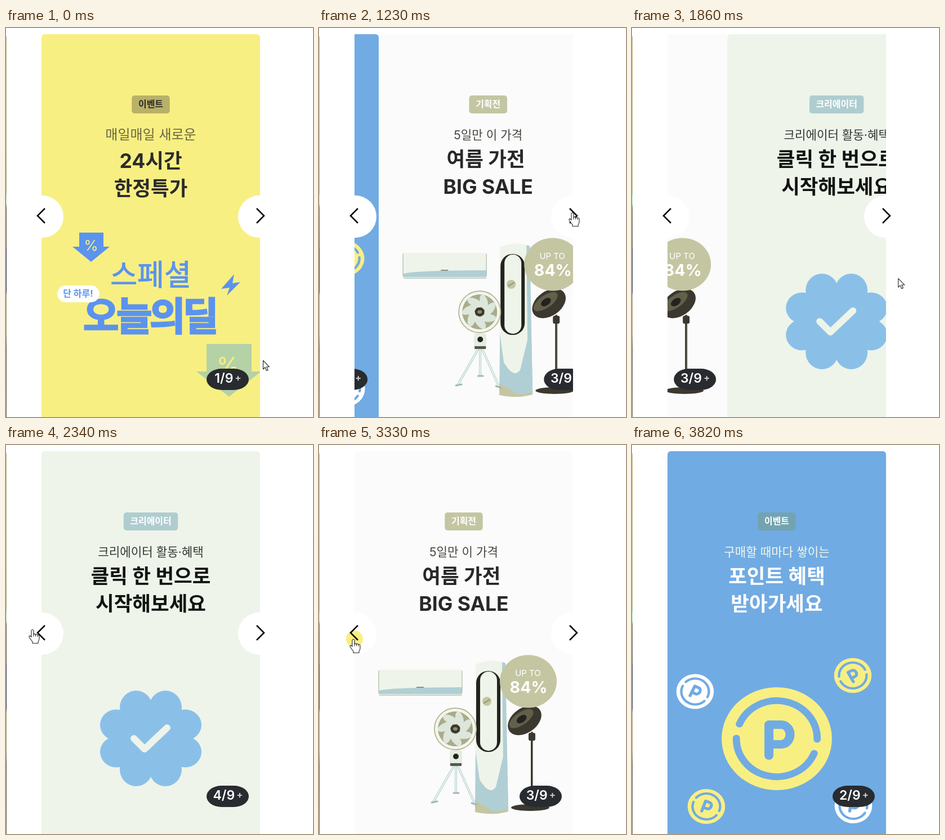
An HTML page that plays this animation: 545 by 692 pixels, repeating every 3970 ms.

```html
<!DOCTYPE html>
<html lang="ko">
<meta charset="utf-8">
<title>Banner carousel</title>
<style>
  html, body { margin: 0; height: 100%; overflow: hidden; background: #fff; }
  svg { display: block; width: 100%; height: 100%; }
  text { font-family: Inter, "Noto Sans CJK KR", "Noto Sans CJK", sans-serif; text-anchor: middle; white-space: pre; }
  .b { font-weight: 700; }
  .line { fill: none; stroke-linecap: round; stroke-linejoin: round; }
</style>
<svg viewBox="0 0 545 692">
  <defs>
    <clipPath id="view"><rect x="63" y="11" width="388" height="681"/></clipPath>
    <linearGradient id="edge" x2="0" y2="1">
      <stop offset="0" stop-color="#b3ac7c"/><stop offset=".41" stop-color="#aaa878"/>
      <stop offset=".42" stop-color="#a9dcae"/><stop offset=".44" stop-color="#a9dcae"/>
      <stop offset=".45" stop-color="#66613f"/><stop offset=".55" stop-color="#55513a"/>
      <stop offset=".56" stop-color="#30304c"/><stop offset=".67" stop-color="#30304c"/>
      <stop offset=".68" stop-color="#9c9768"/><stop offset=".78" stop-color="#9c9768"/>
      <stop offset=".82" stop-color="#55513a"/><stop offset="1" stop-color="#6b6645"/>
    </linearGradient>
  </defs>
  <rect y="15" width="1" height="677" fill="url(#edge)"/>
  <g clip-path="url(#view)"><g id="track"></g></g>
  <g id="nav">
    <g fill="#fff"><ellipse cx="64" cy="335.5" rx="38" ry="37.7"/><ellipse cx="450" cy="335.5" rx="38" ry="37.7"/></g>
    <path d="M69 321 56 334l13 13M445 321l13 13-13 13" fill="none" stroke="#000" stroke-width="2.5"/>
  </g>
  <circle id="ripple" r="15" fill="#f8ef83" style="mix-blend-mode:multiply"/>
  <g id="cursor" fill="#fff" stroke="#222" stroke-width="1.1" stroke-linejoin="round">
    <path id="arrow" d="M.5 .5V16l3.5-3.3 2.5 5.8 2.6-1.1-2.5-5.6H11.5Z"/>
    <path id="hand" d="M-4 2Q-2-1 0 2V8.500q2-1 3.500.5 2-.8 3.500.8 3-.5 3 2.200V17q-.5 3-2 5v2.700H-2V22L-7.500 14.500q-1.500-3 1-3.300L-4 13.500ZM0 8.500v4M3.500 9v3.500M7 10v3"/>
  </g>
</svg>
<script>
const $ = id => document.getElementById(id);
const LOOP = 3970, STEP = 69, LAST = 55, WIDTH = 388, SLIDE_MS = 400;
const YELLOW = '#f8ef83', BLUE = '#5b93ee', SKY = '#71abe3', MINT = '#eef4ea', ICE = '#b0cfd4';
const INK = '#26282a', OLIVE = '#c4c6a2', DARK = '#3a382f', BLACK = '#22231e';

const text = (x, y, size, fill, str, attrs = '') =>
  `<text x="${x}" y="${y}" font-size="${size}" fill="${fill}" ${attrs}>${str}</text>`;
const bold = (x, y, size, fill, str) => text(x, y, size, fill, str, 'class="b"');
const rect = (x, y, w, h, fill, r = 0) =>
  `<rect x="${x}" y="${y}" width="${w}" height="${h}" rx="${r}" fill="${fill}"/>`;
const oval = (x, y, rx, ry, attrs) => `<ellipse cx="${x}" cy="${y}" rx="${rx}" ry="${ry}" ${attrs}/>`;
const path = (d, fill) => `<path d="${d}" fill="${fill}"/>`;
const line = (d, stroke, width) => `<path class="line" d="${d}" stroke="${stroke}" stroke-width="${width}"/>`;

const coin = (x, y, scale, turn, fill) =>
  `<g transform="translate(${x} ${y}) scale(1.07 1) rotate(${turn}) scale(${scale})">
    <circle r="91.5" fill="${fill}"/>
    ${line('M-62-26A67 67 0 0 1 67 1M-67-1A67 67 0 0 0 62 26', SKY, 12)}
    ${line('M-13 30V-25H7.5a14.5 17.500 0 0 1 0 35H-13', SKY, 15)}
  </g>`;

const special = () =>
  path('M130 364H173V389H184L151 416 118 389H130Z', BLUE) + text(151, 396, 26, YELLOW, '%') +
  text(257, 458, 52, BLUE, '스페셜', `font-weight="500" stroke="${BLUE}"`) +
  text(255, 538, 69, BLUE, '오늘의딜', `font-weight="900" letter-spacing="-4.5" stroke="${BLUE}" stroke-width="2.5"`) +
  rect(91, 458, 75, 30, '#fff', 15) + bold(128, 478, 16, BLUE, '단 하루!') +
  path('M405 438 382 464 397 462 392 476 416 452 402 454Z', BLUE) +
  path('M356 562H436V611H453L396 656 338 611H356Z', '#b5d1a6') + text(394, 616, 42, YELLOW, '%');

const points = () =>
  coin(257, 522.5, 1, 0, YELLOW) + coin(112, 438.5, .34, 25, '#fff') + coin(392, 410, .34, -28, YELLOW) +
  coin(132, 643, .34, 20, YELLOW) + coin(393, 642, .34, 10, '#fff');

const blades = () => Array.from({ length: 7 }, (_, i) =>
  `<ellipse cx="15" cy="11" rx="14" ry="7" fill="#dde6da" transform="translate(242 505) rotate(${i * 360 / 7})"/>`).join('');

const appliances = () =>
  // wall unit
  rect(105, 400, 149, 46, MINT, 2) + path('M106 437Q130 431 254 431V443H106Z', ICE) +
  line('M106 402V440M254 402V440M108 445H253', '#b9c7b8', 1.5) + rect(173, 430, 13, 2, '#8d9284') +
  // tower unit
  path('M278 390Q306 378 331 388L336 652Q306 660 277 652Z', MINT) +
  path('M325 386 331 388 336 652H328Z', ICE) +
  path('M278 545 285 595Q303 625 314 608L328 550 334 560 336 652Q306 660 277 652Z', ICE) +
  path('M277 632 310 652 335 648V652Q306 660 277 653Z', OLIVE) +
  rect(279, 402, 43, 144, BLACK, 21) + rect(286, 403, 30, 141, MINT, 15) +
  oval(298, 456, 8, 8, `fill="${OLIVE}"`) + line('M293 459l10-6', '#8d9075', 2) +
  // tripod fan
  line('M240 570 203 635M243 570V618M246 570 276 637', ICE, 4) +
  line('M240 570 203 635M243 570V618M246 570 276 637', MINT, 2) +
  line('M200 636l10-2M239 619h9M271 637l9 3', '#a0b8ba', 3) +
  oval(242, 505, 37, 37, 'fill="#f4f6ee" stroke="#b9bb98" stroke-width="2"') +
  oval(242, 505, 31, 31, 'fill="#a9ab8c"') + blades() +
  oval(242, 505, 8.500, 8, `fill="${DARK}"`) + oval(242, 505, 4, 3, 'fill="#8e8b6b"') +
  rect(232, 543, 22, 28, '#e6ece0', 4) + rect(233, 566, 20, 5, '#55574b') + oval(243, 554, 5, 5, `fill="${BLACK}"`) +
  // pedestal fan
  line('M378 512V641', DARK, 4) + line('M379.500 520V638', '#8d9284', 1) +
  oval(375, 645, 34, 6, `fill="${DARK}"`) + rect(372, 512, 12, 14, DARK, 3) +
  `<g transform="translate(365 490) rotate(-35)">${oval(0, 0, 33, 22, `fill="${DARK}"`)}${oval(-3, -6, 25, 11, 'fill="#625f4a"')}${oval(-3, -5, 10, 6, `fill="${BLACK}"`)}</g>` +
  oval(371.500, 420.500, 50.500, 47, `fill="${OLIVE}"`) + text(371, 411, 15, '#fff', 'UP TO') + bold(372, 441, 28.500, '#fff', '84%');

const verified = () => {
  const lobes = [-1, 1].flatMap(sx => [-1, 1].map(sy =>
    oval(257 + sx * 26, 522 + sy * 55, 29, 30, '') + oval(257 + sx * 61, 522 + sy * 24, 29, 27.500, '')));
  return `<g fill="#8ac0e8">${lobes.join('')}<rect x="203" y="472" width="108" height="101"/></g>` +
    line('M227 522 246 541 286 503', MINT, 12);
};

const slides = [
  { bg: YELLOW, tag: '이벤트', tagBg: '#b9b168', tagInk: '#2b2b2b', sub: '매일매일 새로운', subInk: '#6b673f', subSize: 24,
    title: ['24시간', '한정특가'], ink: '#2b2b2b', drop: 3, art: special },
  { bg: SKY, tag: '이벤트', tagBg: '#74a3b0', sub: '구매할 때마다 쌓이는', subInk: '#f4f8ec',
    title: ['포인트 혜택', '받아가세요'], ink: '#fff', art: points },
  { bg: '#fbfbfb', tag: '기획전', tagBg: OLIVE, sub: '5일만 이 가격', subInk: '#45473f',
    title: ['여름 가전 ', 'BIG SALE'], ink: INK, art: appliances },
  { bg: MINT, tag: '크리에이터', tagBg: '#afcdd0', sub: '크리에이터 활동·혜택', subInk: '#333631',
    title: ['클릭 한 번으로', '시작해보세요'], ink: '#111412', art: verified },
];

$('track').innerHTML = slides.map((s, i) => {
  const tagWidth = s.tag.length * 14.500 + 24, drop = s.drop || 0;
  return `<g transform="translate(${i * WIDTH} 0)">` +
    rect(63, 11, WIDTH, 700, s.bg, 6) +
    rect(257 - tagWidth / 2, 120, tagWidth, 32, s.tagBg, 5) + bold(257, 141, 16, s.tagInk || '#fff', s.tag) +
    text(257, 198, s.subSize || 21.200, s.subInk, s.sub) +
    s.title.map((row, n) => bold(257, 246 + drop + n * 49, 35.500, s.ink, row)).join('') +
    s.art() +
    `<rect x="356" y="606" width="75" height="38" rx="27" ry="19" fill="#282b2f"/>` +
    text(394, 631, 23, '#fff', `${i + 1}/9<tspan dx="3" dy="-3" font-size="17" fill="#d5d8d0">+</tspan>`, 'font-weight="600"') +
    '</g>';
}).join('');

// [start, direction] of each slide change
const moves = [[400, 1], [1000, 1], [1690, 1], [2794, -1], [3333, -1]];
// [time, x, y]
const trail = [[0, 456, 591], [300, 451, 325], [360, 451, 318], [1000, 451, 318], [1200, 452, 328], [1720, 452, 328],
  [2130, 510, 664], [2250, 510, 664], [2251, 49, 328], [2350, 49, 328], [2700, 63, 345], [3350, 63, 345],
  [3519, 484, 682], [3570, 484, 720], [LOOP, 484, 720]];

// CSS "ease": cubic-bezier(.25, .1, .25, 1)
function ease(p) {
  if (p <= 0) return 0;
  if (p >= 1) return 1;
  const bezier = (a, b, u) => 3 * a * u * (1 - u) ** 2 + 3 * b * u * u * (1 - u) + u ** 3;
  let lo = 0, hi = 1;
  for (let i = 0; i < 20; i++) {
    const mid = (lo + hi) / 2;
    if (bezier(.25, .25, mid) < p) lo = mid; else hi = mid;
  }
  return bezier(.1, 1, lo);
}

function pointer(t) {
  const i = trail.findIndex(k => k[0] > t);
  const [t0, x0, y0] = trail[i - 1], [t1, x1, y1] = trail[i];
  const p = (t - t0) / (t1 - t0);
  return [x0 + (x1 - x0) * p, y0 + (y1 - y0) * p];
}

const show = (id, on) => $(id).setAttribute('visibility', on ? 'visible' : 'hidden');

function draw(now) {
  const t = Math.min(LAST, Math.floor((now % LOOP + 20) / STEP)) * STEP;
  const pos = moves.reduce((sum, [start, dir]) => sum + dir * ease((t - start) / SLIDE_MS), 0);
  $('track').setAttribute('transform', `translate(${-pos * WIDTH} 0)`);

  const [x, y] = pointer(t);
  const at = `translate(${x} ${y})`;
  const overLink = x < 451 || (x < 465 && Math.abs(y - 335) < 38);
  $('cursor').setAttribute('transform', at);
  $('ripple').setAttribute('transform', at);
  show('hand', overLink);
  show('arrow', !overLink);
  show('ripple', moves.some(([start]) => t > start - 70 && t <= start + 20));
  show('nav', !(t > 2190 && t < 2250) && t < 3560);
  requestAnimationFrame(draw);
}
requestAnimationFrame(draw);
</script>
</html>
```
